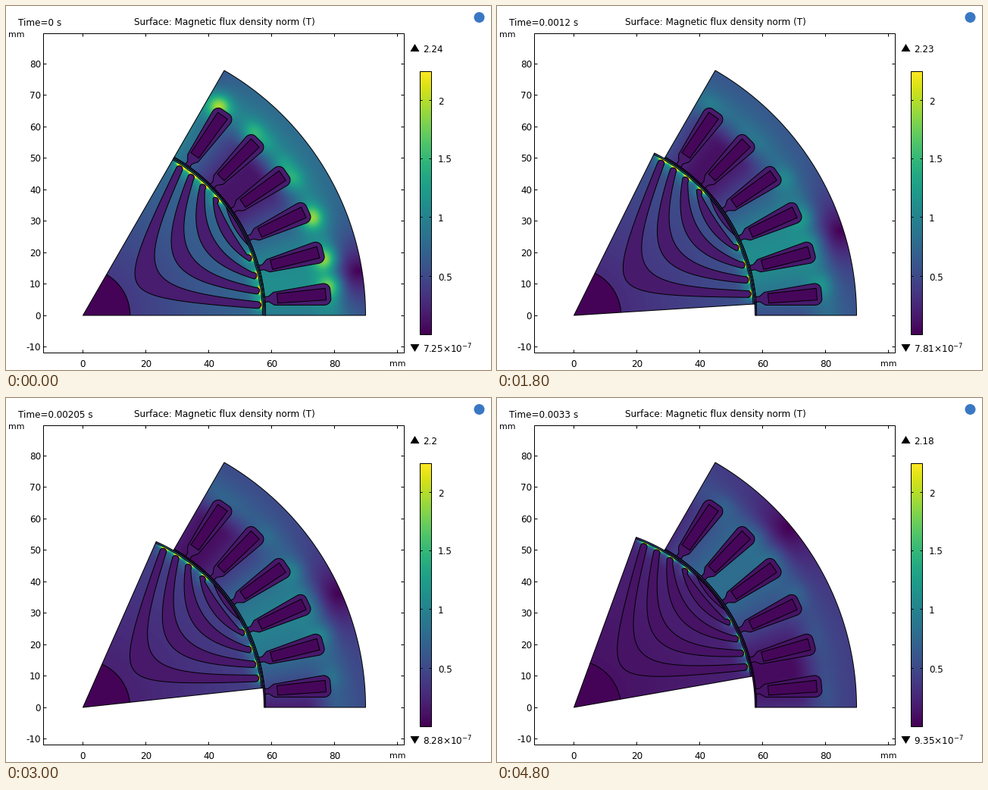
These frames come from a looping animation (640 px wide and 480 px high, 5000 ms). A matplotlib script:

```python
import numpy as np
import matplotlib.pyplot as plt
from matplotlib.animation import FuncAnimation
from matplotlib.patches import Circle, Polygon, Rectangle

plt.rcParams.update({"font.family": "DejaVu Sans", "mathtext.default": "regular"})

FRAMES, INTERVAL = 25, 200
W, H, DPI = 640, 480, 100
PX = 72 / DPI                      # one pixel in points
SCALE, CENTER = 4.145, (101.5, 408)
B_MAX = 2.24
CMAP = plt.get_cmap("viridis")

R_SHAFT, R_ROTOR, R_SLIDE, R_BORE, R_OUT = 62.2, 237, 239, 241, 373
SLOT_ANGLES = range(5, 60, 10)
# start on the pole axis of the outer and inner edge, angle of the tip
BARRIERS = [(83, 115, 26.6), (142, 163, 21.9), (183, 200, 16.9), (213, 225.5, 10.9)]
TIP_R = 231

# solution values at key frames
KEYS = [0, 3, 6, 11, 15, 20, 24]
SERIES = {
    "max": [2.24, 2.22, 2.22, 2.24, 2.2, 2.22, 2.18],
    "min": [7.25, 7.5, 7.65, 7.92, 8.28, 8.91, 9.35],
    "pole": [9.2, 12, 14.7, 19.6, 24, 32.9, 40],
    "yoke": [1.0, .95, .86, .74, .66, .57, .52],
    "tooth": [1.1, 1.12, 1.12, 1.07, .97, .86, .8],
    "corner": [.65, .3, .26, .26, .26, .26, .26],
    "rotor": [.68, .62, .56, .45, .37, .27, .19],
    "air": [.17, .17, .16, .15, .14, .13, .11],
}


def value(name, k):
    return np.interp(k, KEYS, SERIES[name])


def polar(r, deg):
    return r * np.exp(1j * np.radians(deg))


def to_px(z):
    z = np.atleast_1d(z)
    return np.column_stack([CENTER[0] + z.real, CENTER[1] - z.imag])


def arc(r, a, b):
    return polar(r, np.linspace(a, b, 90))


def color(b):
    return CMAP(b / B_MAX)


def smooth(x, a, b):
    s = np.clip((x - a) / (b - a), 0, 1)
    return s * s * (3 - 2 * s)


# ---- geometry, complex numbers with the local axis along the real line ----
def edge(start, tip_angle):
    """Hyperbola from tip to tip, symmetric about the pole axis."""
    tip, slope = polar(TIP_R, tip_angle), 1.55
    rise = tip.real - start
    a = ((slope * tip.imag) ** 2 - rise ** 2) / (2 * rise)
    q = np.linspace(-tip.imag, tip.imag, 61)
    return start + np.sqrt(a * a + (slope * q) ** 2) - a + 1j * q


def cap(a, b):
    """Half circle from a to b, bulging outwards."""
    mid = (a + b) / 2
    return mid + (a - mid) * np.exp(-1j * np.linspace(0, np.pi, 13))


def barrier(outer, inner, tip):
    out, inn = edge(outer, tip + 1.1), edge(inner, tip - 1.1)[::-1]
    return np.concatenate([out, cap(out[-1], inn[0]), inn, cap(inn[-1], out[0])])


def lens():
    tip = polar(R_ROTOR, 7)
    q = np.linspace(-1, 1, 31)
    return np.concatenate([231 + (tip.real - 231) * q ** 2 + 1j * tip.imag * q,
                           arc(R_ROTOR, 7, -7)])


def slot():
    corner = np.linspace(0, np.pi / 2, 9)
    side = np.concatenate([[241 + 3.5j, 246 + 3.5j, 253 + 8.5j, 319 + 14.3j],
                           319 + 9 * np.sin(corner) + 1j * (6 + 8.3 * np.cos(corner))])
    return np.concatenate([side, side.conj()[::-1]])


CONDUCTOR = np.array([257.5 + 6.3j, 321.5 + 7.7j, 321.5 - 7.7j, 257.5 - 6.3j])

# ---- flux density ----
X0, X1, Y0, Y1 = 98, 478, 80, 412
gx, gy = np.meshgrid(np.arange(X0, X1) + .5, np.arange(Y0, Y1) + .5)
Z = (gx - CENTER[0]) + 1j * (CENTER[1] - gy)
R, THETA = np.abs(Z), np.degrees(np.angle(Z))


def stator_field(k):
    pole, yoke, tooth = (value(n, k) for n in ("pole", "yoke", "tooth"))

    def parts(theta):
        u = np.radians(3 * (theta - pole))
        radial = tooth * np.cos(u) * np.sqrt(np.abs(np.cos(u)))
        return radial, yoke * np.tanh(2 * np.sin(u))

    radial, tangential = parts(THETA)
    radial = radial * (1 - smooth(R, 305, R_OUT))
    tangential = tangential * (.13 + .92 * smooth(R, 290, 340) - .22 * smooth(R, 330, R_OUT))
    field = np.hypot(radial, tangential)
    for angle in SLOT_ANGLES:
        br, bt = parts(angle)
        for side in (-1, 1):
            spot = polar(328, angle + 1.9 * side)
            strength = value("corner", k) * (bt - side * br) ** 2 / 1.6
            field += strength * np.exp(-np.abs(Z - spot) ** 2 / (2 * 11 ** 2))
    return field


def rotor_field(k, turn):
    base = value("rotor", k)
    field = base * (.35 + .8 * R / R_ROTOR)
    for *_, tip in BARRIERS:
        for side, spread in ((-1, 1.3), (1, 1.9)):
            angle = 30 + turn + side * tip
            halo = np.exp(-np.abs(Z - polar(234, angle)) ** 2 / (2 * 7 ** 2))
            bridge = np.exp(-((THETA - angle) / spread) ** 2 - ((R - 235.8) / 2) ** 2)
            field += (.2 + .6 * base) * halo + 1.6 * bridge
    field[R < R_SHAFT] = .02
    return field


def flux(k, turn):
    local = THETA - turn
    rotor = (R < R_SLIDE) & (local >= 0) & (local <= 60)
    stator = (R >= R_SLIDE) & (R < R_OUT) & (THETA >= 0) & (THETA <= 60)
    field = np.where(rotor, rotor_field(k, turn), stator_field(k))
    field[(R > R_ROTOR) & (R < R_BORE)] *= .7
    return np.ma.masked_where(~(rotor | stator), field)


# ---- stage ----
fig = plt.figure(figsize=(W / DPI, H / DPI), dpi=DPI, facecolor="white")
ax = fig.add_axes([0, 0, 1, 1])
ax.axis("off")


def label(x, y, text, ha="left", size=12):
    return ax.text(x, y, text, ha=ha, va="center_baseline", fontsize=size * PX)


def line(x, y, **kw):
    return ax.plot(x, y, color="black", lw=PX, snap=False,
                   solid_capstyle="butt", **kw)[0]


def outline(z=None, fill="none", zorder=3):
    xy = to_px(z) if z is not None else np.zeros((3, 2))
    return ax.add_patch(Polygon(xy, closed=True, fc=fill, ec="black", lw=PX,
                                joinstyle="round", snap=False, zorder=zorder))


def frame_box(x, y, w, h):
    ax.add_patch(Rectangle((x, y), w, h, fc="none", ec="black", lw=PX,
                           snap=False, zorder=5))


def pixel_center(v):
    return np.floor(v) + .5


def draw_axes():
    left, right, top, bottom = 49.5, 525.5, 36.5, 457.5
    frame_box(left, top, right - left, bottom - top)
    for v in range(0, 101, 20):
        x = pixel_center(CENTER[0] + v * SCALE)
        line([x, x], [bottom - 4, bottom])
        line([x, x], [top, top + 4])
        if v < 100:
            label(x, 471, str(v), "center")
    for v in range(-10, 81, 10):
        y = pixel_center(CENTER[1] - v * SCALE)
        line([left, left + 4], [y, y])
        line([right - 4, right], [y, y])
        label(46, y - .5, str(v), "right")
    label(3, 37, "mm", size=11)
    label(506, 471, "mm", size=11)
    label(169, 20.5, "Surface: Magnetic flux density norm (T)")


def draw_colorbar():
    left, right, top, bottom = 546.5, 561.5, 86.5, 433.5
    ax.imshow(np.linspace(1, 0, 256)[:, None], cmap=CMAP, aspect="auto",
              extent=(left, right, bottom, top))
    frame_box(left, top, right - left, bottom - top)
    for v in (.5, 1, 1.5, 2):
        y = pixel_center(bottom - v * 154.7)
        line([left, left + 3], [y, y])
        line([right - 3, right], [y, y])
        label(570, y, f"{v:g}")
    for base, tip in ((60, 50), (446, 456)):
        ax.add_patch(Polygon([(533.5, base), (545.5, base), (539.5, tip)], fc="black", lw=0))


draw_axes()
draw_colorbar()
ax.add_patch(Circle((624.5, 15), 7, fc="#3a78c3", lw=0))

image = ax.imshow(flux(0, 0), cmap=CMAP, vmin=0, vmax=B_MAX, aspect="auto",
                  extent=(X0, X1, Y1, Y0), interpolation="nearest", zorder=1)
ax.set_xlim(0, W)
ax.set_ylim(H, 0)

outline(np.concatenate([arc(R_BORE, 0, 60), arc(R_OUT, 60, 0)]))
outline(np.concatenate([arc(R_SLIDE, 0, 60), arc(R_BORE, 60, 0)]))
slots = [outline(slot() * polar(1, a)) for a in SLOT_ANGLES]
for a in SLOT_ANGLES:
    outline(CONDUCTOR * polar(1, a), color(.04), zorder=4)

sector = np.concatenate([[0], arc(R_SLIDE, -30, 30)])
rim = arc(R_ROTOR, -30, 30)
shaft = arc(R_SHAFT, -30, 30)
hollow_shapes = [barrier(*b) for b in BARRIERS] + [lens()]
sector_patch = outline()
hollows = [outline() for _ in hollow_shapes]
rim_line, shaft_line = line([], [], zorder=3), line([], [], zorder=3)

time_text = label(16, 20.5, "")
max_text = label(550, 56, "")
min_text = label(550, 451, "")


def time_label(steps):
    t = steps * 5e-5
    if steps == 0:
        return "0"
    return f"{steps / 2:g}E-4" if steps < 20 else f"{t:.5g}"


def update(k):
    steps = int(2.75 * k)
    turn = .15 * steps
    spin = polar(1, 30 + turn)
    air = color(value("air", k))

    image.set_data(flux(k, turn))
    sector_patch.set_xy(to_px(sector * spin))
    for patch, shape in zip(hollows, hollow_shapes):
        patch.set_xy(to_px(shape * spin))
    for patch in hollows + slots:
        patch.set_facecolor(air)
    rim_line.set_data(*to_px(rim * spin).T)
    shaft_line.set_data(*to_px(shaft * spin).T)

    time_text.set_text(f"Time={time_label(steps)} s")
    max_text.set_text(f"{value('max', k):.3g}")
    min_text.set_text(f"{value('min', k):.3g}×10$^{{-7}}$")
    return []


anim = FuncAnimation(fig, update, frames=FRAMES, interval=INTERVAL,
                     repeat=True, repeat_delay=0, blit=False)
plt.show()
```
